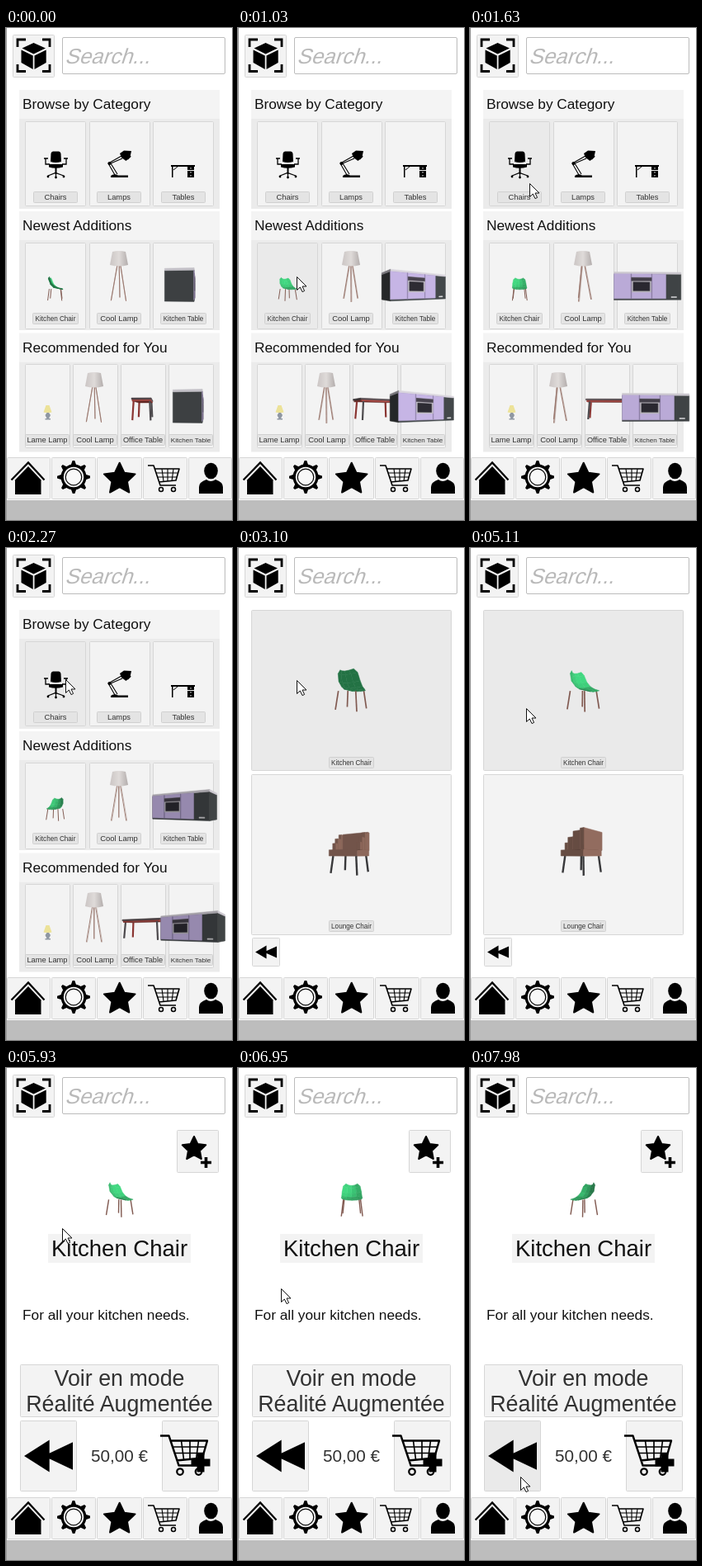
Write an HTML page with a canvas that moves like this. It is 274x596 px and loops after 8 s.

```html
<!DOCTYPE html>
<html lang="en">
<head>
<meta charset="utf-8">
<title>Furniture shop</title>
<style>
html, body { margin: 0; width: 100%; height: 100%; overflow: hidden; background: #fff; }
svg, canvas { position: absolute; left: 0; top: 0; width: 274px; height: 596px; }
text { font-family: "Liberation Sans", Arial, sans-serif; fill: #111; white-space: pre; }
.mid { text-anchor: middle; }
.soft { fill: #323232; }
.btn { fill: #f3f3f3; stroke: #d6d6d6; }
.btn.hover { fill: #eaeaea; }
.tag { fill: #e4e4e4; stroke: #d0d0d0; }
.line { fill: none; stroke: #000; }
</style>
</head>
<body>
<svg id="ui" viewBox="0 0 274 596"></svg>
<canvas id="stage" width="274" height="596"></canvas>
<script>
const LOOP = 8000, LIST_AT = 2520, DETAIL_AT = 5290, SPIN = 50, SIDE_ON = 84;

// ---------- interface ----------
const block = (x, y, r, b, fill) => `<rect x="${x}" y="${y}" width="${r - x}" height="${b - y}" fill="${fill}"/>`;
const framed = (cls, x, y, r, b) =>
  `<rect class="${cls}" x="${x + .5}" y="${y + .5}" width="${r - x - 1}" height="${b - y - 1}" rx="1"/>`;
const btn = (...box) => framed('btn', ...box);
const label = (s, x, y, size, cls = '', extra = '') => `<text class="${cls}" x="${x}" y="${y}" font-size="${size}" ${extra}>${s}</text>`;
const shape = (d, extra = '') => `<path d="${d}" ${extra}/>`;
const line = (d, w, extra = '') => `<path class="line" d="${d}" stroke-width="${w}" ${extra}/>`;
const tag = (s, cx, y, half, size) =>
  framed('tag', cx - half, y, cx + half, y + 14) + label(s, cx, y + 10.3, size, 'mid soft');

const ring = (n, radius) => Array.from({ length: n }, (_, i) => {
  const a = i * 2 * Math.PI / n - Math.PI / 2, r = radius(i);
  return [(r * Math.cos(a)).toFixed(2), (r * Math.sin(a)).toFixed(2)];
}).join(' ');
const star = (x, y, r) => `<polygon points="${ring(10, i => i % 2 ? r * .49 : r)}"
  transform="translate(${x} ${y})" stroke="#000" stroke-width="2" stroke-linejoin="round"/>`;
const gear = (x, y) => `<g transform="translate(${x} ${y})">
  <polygon points="${ring(48, i => i % 6 < 2 ? 20 : 15.5)}" transform="rotate(-4)"/>
  <circle r="12.2" fill="#f8f8f8"/><circle class="line" r="9.8" stroke-width="1.2"/></g>`;
const cart = (x, y, s) => `<g transform="translate(${x} ${y}) scale(${s})">
  ${line('M0 1H7L15 25H34M8 5H38L34 19L13 21', 1.6, 'stroke-linejoin="round"')}
  ${line('M10 10H37M12 15H35M17 5L19 20M24 5V20M31 5L29 20', 1.1)}
  <circle class="line" cx="16" cy="30" r="2.5" stroke-width="1.5"/><circle class="line" cx="31" cy="30" r="2.5" stroke-width="1.5"/></g>`;
const plus = (x, y, r, w) => line(`M${x - r} ${y}h${2 * r}M${x} ${y - r}v${2 * r}`, w);
const rewind = (x, y, w, h) =>
  shape(`M${x} ${y}l${w * .52} ${-h / 2}v${h}zM${x + w * .4} ${y}l${w * .6} ${-h * .43}v${h * .86}z`);

const chrome = () => block(0, 0, 1, 596, '#9c9c9c') + block(1, 572, 274, 596, '#bdbdbd') +
  btn(8, 8, 59, 60) +
  line('M14 23V14H24M44 14H53V23M14 44V52.5H24M44 52.5H53V44', 2.8) +
  shape('M33.5 18L48 24.5L33.5 31.5L19.5 24.5ZM18.5 26.5L32.7 33.5V50L18.5 42ZM48.7 26.5L34.5 33.5V50L48.7 42Z') +
  '<rect x="68.5" y="11.5" width="197" height="44" rx="1.5" fill="#fff" stroke="#bcbcbc"/>' +
  label('Search...', 0, 0, 25.8, '', 'transform="translate(71 42.5) skewX(-18)" style="fill:#b9b9b9"') +
  [1, 55, 110, 166, 221].map((x, i, a) => btn(x, 520, (a[i + 1] || 275) - 1, 571)).join('') +
  line('M6.5 547.5L27 526.5L46.5 547.5', 2.3) + shape('M11 547.5L27 531L42.5 547.5V565H11Z') +
  gear(82, 544) + star(137.7, 546.5, 19.8) + cart(172, 529, 1) +
  '<ellipse cx="248.5" cy="536.5" rx="8.3" ry="9.8"/>' +
  shape('M234 564V556Q234 550 243 547Q248 551 254 547Q263 550 263 556V564Z');

const section = (title, y) => block(16, y, 259, y + 35, '#f4f4f4') +
  block(16, y + 35, 259, y + 144, '#ebebeb') + label(title, 20, y + 23, 17.25);

const chairIcon = shape('M54.5 152Q55 149.5 57 149.5H64Q66 149.5 66.5 152L67 162Q60 164 54 162ZM52 165H69V168.5Q60 171 52 168.5Z') +
  line('M48 158V165H53M73 158V165H68M46 158H51M70 158H75', 1.3) +
  line('M60.5 168V177', 2) + line('M51 179L60 175.5L70 179M60.5 175V180', 1.2) +
  [[51, 180], [60.5, 181], [70, 180]].map(([x, y]) => `<circle cx="${x}" cy="${y}" r="1.4"/>`).join('');
const lampIcon = line('M132 178L124 164L140 155M135 177L127 164L141 158', 1.1) +
  '<circle cx="125.5" cy="164" r="2"/>' +
  shape('M127 181V179Q131 176 136 178.5H148V181ZM138 152L143 148.5L152 149L150.5 156L145.5 161L140 157Z') +
  line('M147 159L151 155', 2);
const deskIcon = block(200, 166, 229, 168, '#000') + block(201, 168, 202.5, 181, '#000') +
  [168, 173, 177].map(y => block(220, y, 228, y + 4, '#000') + block(223, y + 1.5, 225, y + 2.3, '#fff')).join('') +
  line('M203 172L208 168', 1);

const columns = [23, 101, 178];
const home = section('Browse by Category', 75) + columns.map(x => btn(x, 113, x + 74, 216)).join('') +
  ['Chairs', 'Lamps', 'Tables'].map((s, i) => tag(s, [60, 137, 215][i], 198, 27, 9.35)).join('') +
  chairIcon + lampIcon + deskIcon +
  section('Newest Additions', 222) + columns.map(x => btn(x, 260, x + 74, 365)).join('') +
  tag('Kitchen Chair', 60, 345, 28, 8.15) + tag('Cool Lamp', 137, 345, 27, 9.45) + tag('Kitchen Table', 215, 345, 28, 8.15) +
  section('Recommended for You', 369.5) + [23, 81, 139, 197].map(x => btn(x, 407, x + 55, 509)).join('') +
  tag('Lame Lamp', 50, 492, 27, 9.3) + tag('Cool Lamp', 108, 492, 27, 9.45) +
  tag('Office Table', 166, 492, 27, 9.2) + tag('Kitchen Table', 224, 492, 27, 8.1);

const list = btn(16, 75, 259, 270) + btn(16, 274, 259, 469) + btn(17, 472, 51, 507) +
  tag('Kitchen Chair', 137.5, 253, 27.5, 8.15) + tag('Lounge Chair', 137.5, 451, 27.5, 8.15) + rewind(21, 489.5, 26, 16);

const detail = btn(207, 75, 258, 127) + star(228, 98, 15) + plus(242.5, 114.5, 6.5, 3.6) +
  block(51, 201, 224, 236, '#f3f3f3') + label('Kitchen Chair', 137.5, 228, 27.5, 'mid') +
  label('For all your kitchen needs.', 20, 305, 17.3) +
  btn(17, 359, 258, 423) + label('Voir en mode', 137.5, 385, 26.8, 'mid soft') +
  label('Réalité Augmentée', 137.5, 415.5, 26.8, 'mid soft') +
  btn(17, 427, 86, 513) + rewind(22, 470, 59, 39) + label('50,00 €', 137.5, 477, 20.7, 'mid soft') +
  btn(189, 427, 258, 513) + cart(187, 444, 1.5) + plus(236, 478, 11.5, 9);

const ui = document.getElementById('ui');
ui.innerHTML = chrome() + [home, list, detail].map(s => `<g class="page">${s}</g>`).join('');
const pages = [...ui.querySelectorAll('.page')];
const buttons = pages.map(p => [...p.querySelectorAll('.btn')].map(el => ({
  el, x: +el.getAttribute('x'), y: +el.getAttribute('y'), w: +el.getAttribute('width'), h: +el.getAttribute('height')
})));

// ---------- turning models ----------
const ctx = document.getElementById('stage').getContext('2d');
const CAMERA = 150, LIGHT = [.5, .3, .8];
const SIDES = ['4576', '1023', '5137', '0462', '6732', '0154']; // front, back, right, left, top, bottom
const sub = (a, b) => a.map((v, i) => v - b[i]);
const dot = (a, b) => a[0] * b[0] + a[1] * b[1] + a[2] * b[2];
const cross = (a, b) => [a[1] * b[2] - a[2] * b[1], a[2] * b[0] - a[0] * b[2], a[0] * b[1] - a[1] * b[0]];

const box = (x, y, z, color, bias = 0) => SIDES.map(side => ({
  pts: [...side].map(i => [x[i & 1], y[i >> 1 & 1], z[i >> 2]]), color, bias
}));
const lid = (...args) => box(...args).slice(0, 5);
const panel = (x, y, z, color, bias) => box(x, y, [z, z], color, bias)[0];
const rod = (a, b, color, width) => ({ pts: [a, b], color, width, bias: 0 });
const corners = [[-1, -1], [1, -1], [-1, 1], [1, 1]];

function shellChair() {
  const profile = [[-15, 21, 9], [-13.5, 17, 13], [-10, 8, 14.5], [-4, 2, 14.5], [6, 0, 14.5], [15, -2, 12]];
  const at = (i, u) => {
    const [z, y, w] = profile[i], curl = u * u * (i < 4 ? 4 : 2);
    return [u * w, y + curl * .6, z + (i < 4 ? curl : 0)];
  };
  const faces = [];
  for (let i = 0; i < 5; i++)
    for (let u = -1; u < 1; u += .5)
      faces.push({ pts: [at(i, u), at(i + 1, u), at(i + 1, u + .5), at(i, u + .5)], color: [63, 208, 124], both: true, bias: 0 });
  corners.forEach(([x, z]) => faces.push(rod([11.5 * x, -1, 11 * z], [14 * x, -23, 13.5 * z], [140, 98, 88], 1.7)));
  return faces;
}

const brown = [146, 108, 95];
const loungeChair = [
  ...box([-18, 18], [-1, 6], [-16, 18], brown),
  ...box([-18, 18], [6, 28], [-17, -12], brown),
  ...[-18, 14].flatMap(x => [[-12, -2, 26], [-2, 6, 20], [6, 11, 14]].flatMap(([back, front, top]) =>
    box([x, x + 4], [6, top], [back, front], brown))),
  ...corners.map(([x, z]) => rod([15 * x, -1, 14 * z], [17 * x, -21, 16 * z], [62, 62, 64], 2.4))
];
const steel = [66, 70, 72];
const kitchen = [
  ...box([-37, 37], [-8.5, 20], [-13.5, 13.5], steel),
  ...lid([-37, 37], [20, 22], [-13.5, 13.5], [212, 208, 216], 10),
  panel([-37, 20], [-7, 20], 13.5, [194, 177, 224], 60),
  panel([-18, 4], [0, 16], 13.6, [190, 186, 194], 70),
  panel([-18, 4], [12.5, 16], 13.7, [70, 66, 76], 80),
  panel([-16, 2], [1.5, 11], 13.7, [44, 42, 50], 80),
  ...[-18.6, 4].map(x => panel([x, x + .6], [-7, 20], 13.6, [140, 126, 165], 75)),
  panel([26, 32], [-6, -5], 13.6, [225, 225, 228], 75)
];
const office = [
  ...lid([-25, 25], [8.5, 10], [-10, 10], [84, 72, 76], 15),
  ...box([-24, 24], [7, 8.5], [-9.5, 9.5], [170, 66, 60]),
  ...corners.map(([x, z]) => rod([21 * x, 7, 8.5 * z], [22.5 * x, -13, 9.5 * z], z < 0 ? [150, 58, 54] : [84, 80, 84], 2.2))
];
const tripod = [0, 120, 240].flatMap(d => {
  const a = d * Math.PI / 180, c = Math.cos(a), s = Math.sin(a);
  const leg = (shift, color) => rod([2 * c + shift, 3, 2 * s], [10.2 * c + shift, -40, 10.2 * s], color, 1.1);
  return [leg(-.4, [168, 132, 122]), leg(.5, [214, 198, 192])];
});
const chair = shellChair();

function drawModel(model, cx, cy, scale, degrees) {
  const a = degrees * Math.PI / 180, c = Math.cos(a), s = Math.sin(a);
  const turn = ([x, y, z]) => [x * c + z * s, y, z * c - x * s];
  const flat = ([x, y, z]) => {
    const k = CAMERA / (CAMERA - z) * scale;
    return [cx + x * k, cy - y * k];
  };
  model.map(face => {
    const pts = face.pts.map(turn);
    return { ...face, pts, depth: pts.reduce((sum, p) => sum + p[2], 0) / pts.length + face.bias };
  }).sort((p, q) => p.depth - q.depth).forEach(({ pts, color, width, both }) => {
    let light = .92;
    if (!width) {
      const n = cross(sub(pts[1], pts[0]), sub(pts[2], pts[1])), size = Math.hypot(...n);
      const facing = dot(n, sub([0, 0, CAMERA], pts[0])) > 0;
      if (!facing && !both) return;
      light = .55 + (facing ? .5 * Math.max(0, dot(n, LIGHT) / size) : 0);
    }
    ctx.strokeStyle = ctx.fillStyle = `rgb(${color.map(v => Math.min(255, v * light))})`;
    ctx.lineWidth = width ? width * scale : .5;
    ctx.beginPath();
    pts.map(flat).forEach(p => ctx.lineTo(...p));
    if (!width) { ctx.closePath(); ctx.fill(); }
    ctx.stroke();
  });
}

function fillPath(d, fill) {
  ctx.fillStyle = fill;
  ctx.fill(new Path2D(d));
}
function floorLamp(x, y, degrees) {
  drawModel(tripod, x, y + 19, 1, degrees);
  const shade = ctx.createLinearGradient(x - 11, 0, x + 11, 0);
  shade.addColorStop(0, '#cbc5c4');
  shade.addColorStop(.5, '#dfdbd9');
  shade.addColorStop(1, '#b3adac');
  fillPath(`M${x - 8} ${y + 1}Q${x} ${y - 1} ${x + 8} ${y + 1}L${x + 11} ${y + 17}Q${x} ${y + 20} ${x - 11} ${y + 17}Z`, shade);
}
function tableLamp() {
  fillPath('M48.5 457H52.5L55.5 465.5Q50.5 467 45.5 465.5Z', '#ece298');
  fillPath('M49.5 466H52L54 469L52 473H54V474.5H47.5V473H49.5L47.5 469Z', '#8f97a2');
}

const scenes = [
  t => {
    const angle = SIDE_ON - SPIN * t;
    drawModel(chair, 60, 315.5, .58, angle);
    floorLamp(137, 270, angle);
    drawModel(kitchen, 215, 320, 1, angle);
    tableLamp();
    floorLamp(107, 417, angle);
    drawModel(office, 167, 460, 1, angle);
    drawModel(kitchen, 225, 467, 1, angle);
  },
  t => {
    const angle = -SPIN * (t - LIST_AT / 1000);
    drawModel(chair, 137.5, 172, 1, angle + 180);
    drawModel(loungeChair, 136, 372, 1, angle);
  },
  t => drawModel(chair, 138, 158.5, .84, SIDE_ON - SPIN * (t - DETAIL_AT / 1000))
];

// ---------- pointer ----------
const route = [
  [0, -16, 340], [200, -16, 338], [820, 68, 304], [1030, 71, 301], [1200, 71, 300], [1630, 72, 188],
  [1800, 72, 159], [2500, 72, 159], [3310, 71, 160], [4000, 58, 406], [4200, 58, 406], [4500, 54, 300],
  [4880, 68, 194], [5960, 68, 194], [6500, 52, 194], [6620, 49, 204], [7340, 56, 347], [7750, 62, 499], [8000, 61, 495]
];
function pointerAt(ms) {
  const i = route.findIndex(p => p[0] > ms), [t0, x0, y0] = route[i - 1], [t1, x1, y1] = route[i];
  const u = (ms - t0) / (t1 - t0), e = u * u * (3 - 2 * u);
  return [x0 + (x1 - x0) * e, y0 + (y1 - y0) * e];
}
const arrow = new Path2D('M.5 .5V16.5L4.3 13L7 18.6L9.6 17.4L7 12H12Z');

function render(now) {
  const ms = now % LOOP, page = ms < LIST_AT ? 0 : ms < DETAIL_AT ? 1 : 2, [x, y] = pointerAt(ms);
  pages.forEach((p, i) => { p.style.display = i === page ? '' : 'none'; });
  buttons[page].forEach(b => b.el.classList.toggle('hover', x > b.x && x < b.x + b.w && y > b.y && y < b.y + b.h));
  ctx.clearRect(0, 0, 274, 596);
  ctx.lineJoin = 'round';
  scenes[page](ms / 1000);
  ctx.save();
  ctx.translate(Math.round(x), Math.round(y));
  ctx.fillStyle = '#fff';
  ctx.strokeStyle = '#111';
  ctx.lineWidth = 1;
  ctx.fill(arrow);
  ctx.stroke(arrow);
  ctx.restore();
}
const start = performance.now();
function tick() {
  render(performance.now() - start);
  requestAnimationFrame(tick);
}
tick();
</script>
</body>
</html>
```
